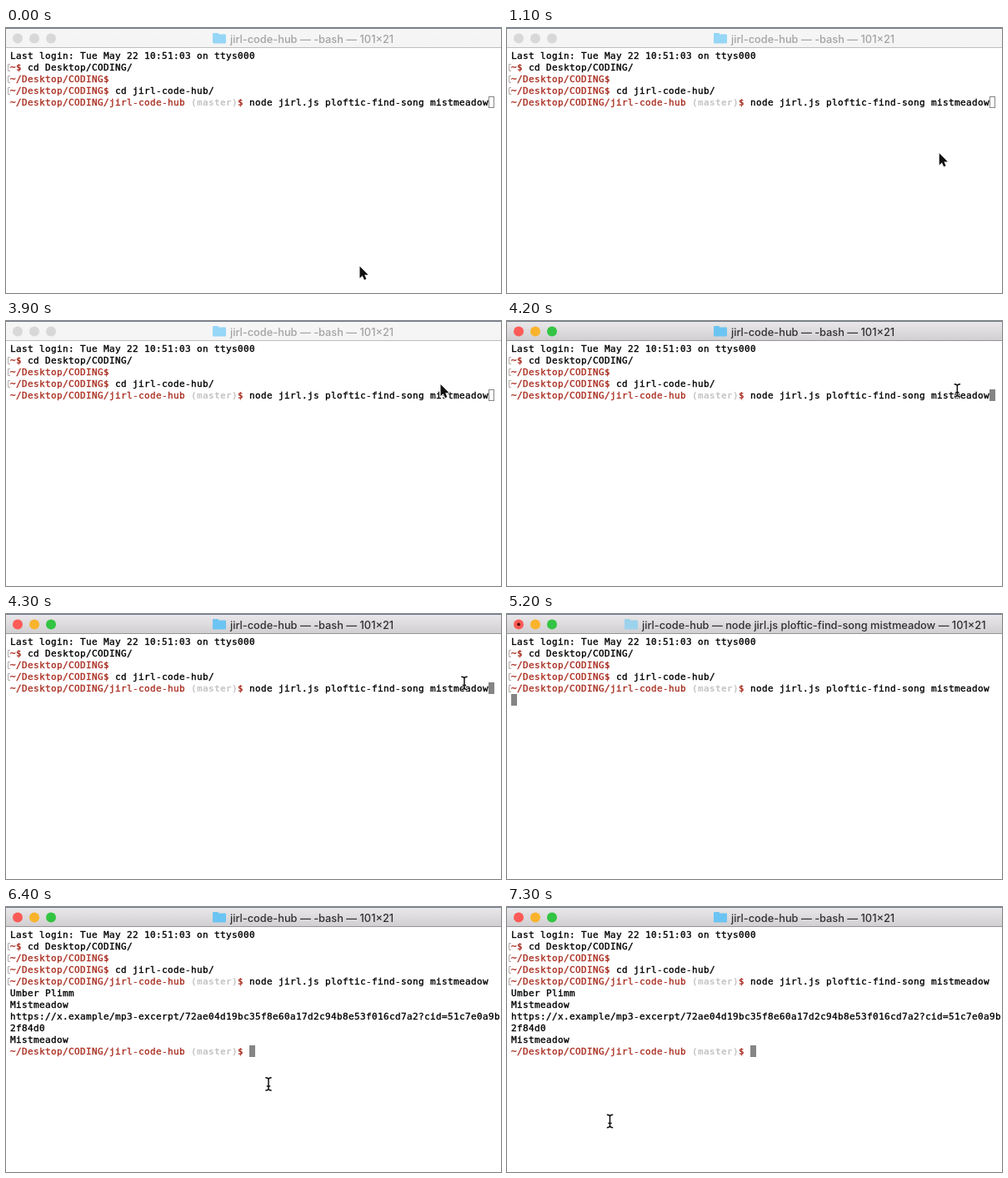
Animation of 594x318 px, one loop 7400 ms. Source, as an HTML page with a canvas:

```html
<!DOCTYPE html>
<html lang="en">
<head>
<meta charset="utf-8">
<title>Terminal session</title>
<style>
html, body { margin: 0; width: 100%; height: 100%; overflow: hidden; background: #fff; }
canvas { display: block; width: 594px; height: 318px; }
</style>
</head>
<body>
<canvas id="stage" width="594" height="318"></canvas>
<script>
const ctx = document.getElementById('stage').getContext('2d');
const W = 594, H = 318, LOOP = 7400, STEP = 100;
const CELL = 7, LINE = 14, LEFT = 5, TOP = 26;
const RED = '#aa2f22', BLACK = '#000', PALE = '#c4c4c4';
const MONO = '11px "DejaVu Sans Mono", monospace';
const SANS = '500 12.8px Inter, sans-serif';

const APP = 'jirl-code-hub';
const COMMAND = 'node jirl.js ploftic-find-song mistmeadow';
const HOME = '~/Desktop/CODING';
const OUTPUT = [
  'Umber Plimm',
  'Mistmeadow',
  'https://x.example/mp3-excerpt/72ae04d19bc35f8e60a17d2c94b8e53f016cd7a2?cid=51c7e0a9b',
  '2f84d0',
  'Mistmeadow'
];

// Moments when the window changes state
const ACTIVE = 4200, RUN = 5000, NEWLINE = 5200, WAKE = 6000, DONE = 6400;

// Pointer strokes; between them it rests
const ORIGIN = { x: 424, y: 286 };
const STROKES = [
  { from: 500, to: 800, x: 574, y: 5 },
  { from: 800, to: 1300, x: 481, y: 247 },
  { from: 1400, to: 1700, x: 521, y: 68 },
  { from: 3800, to: 4000, x: 521, y: 84 },
  { from: 4000, to: 4300, x: 550, y: 83 },
  { from: 5900, to: 6700, x: 174, y: 290 },
  { from: 6700, to: 7300, x: 123.5, y: 257 }
];

const ARROW = new Path2D('M.5 0v14.2l3.2-3 2.3 5 2.4-1.1-2.2-4.8h4.5z');
const BEAM = new Path2D(
  'M-3.7-7.7Q0-7.7 0-5Q0-7.7 3.7-7.7M-3.7 7.7Q0 7.7 0 5Q0 7.7 3.7 7.7M0-6V6M-2.2 2.5H2.2');

function pointerAt(t) {
  return STROKES.reduce((p, s) => {
    const k = Math.min(1, Math.max(0, (t - s.from) / (s.to - s.from)));
    return { x: p.x + (s.x - p.x) * k, y: p.y + (s.y - p.y) * k };
  }, ORIGIN);
}

function put(text, col, row, color = BLACK, bold = false) {
  const x = LEFT + col * CELL, y = TOP + row * LINE + 11;
  ctx.font = (bold ? 'bold ' : '') + MONO;
  ctx.letterSpacing = '0px';
  ctx.letterSpacing = CELL - ctx.measureText('0').width + 'px';
  ctx.fillStyle = ctx.strokeStyle = color;
  ctx.fillText(text, x, y);
  if (!bold) {
    // a hairline gives the regular face a medium weight
    ctx.lineWidth = 0.35;
    ctx.strokeText(text, x, y);
  }
  ctx.letterSpacing = '0px';
  return col + text.length;
}

function prompt(row, path, branch = '', command = '') {
  let col = put(path, 0, row, RED);
  if (branch) col = put(branch, col + 1, row, PALE, true);
  col = put('$', col, row, RED, true);
  return put(command, col + 1, row);
}

function bracket(row) {
  ctx.strokeStyle = '#b5aaaa';
  ctx.lineWidth = 1;
  ctx.stroke(new Path2D(`M5 ${TOP + row * LINE + 3.5}h-2.5v8h2.5`));
}

function caret(col, row, filled) {
  const x = LEFT + col * CELL, y = TOP + row * LINE;
  ctx.fillStyle = ctx.strokeStyle = '#858585';
  ctx.lineWidth = 1;
  if (filled) ctx.fillRect(x, y, CELL, LINE);
  else ctx.strokeRect(x + 0.5, y + 0.5, CELL - 1, LINE - 1);
}

function disc(x, r, fill) {
  ctx.beginPath();
  ctx.arc(x, 12.5, r, 0, Math.PI * 2);
  ctx.fillStyle = fill;
  ctx.fill();
}

function folder(x, color) {
  ctx.fillStyle = color;
  ctx.beginPath();
  ctx.roundRect(x, 6, 7, 5, 1);
  ctx.roundRect(x, 7.5, 16, 11, 1);
  ctx.fill();
}

function titleBar(active, running) {
  const fill = ctx.createLinearGradient(0, 1, 0, 23);
  fill.addColorStop(0, active ? '#e9e7e9' : '#f6f6f6');
  fill.addColorStop(1, active ? '#d1cfd1' : '#f4f4f4');
  ctx.fillStyle = fill;
  ctx.fillRect(0, 0, W, 23);
  ctx.fillStyle = '#6c7c90';
  ctx.fillRect(0, 0, W, 1);
  ctx.fillStyle = active ? '#969497' : '#bdbdbd';
  ctx.fillRect(0, 23, W, 1);

  ['#fc5b57', '#fab32c', '#33c443'].forEach((color, i) => {
    disc(14 + i * 20, 6, active ? color : '#d8d8d8');
  });
  if (running) disc(14, 1.9, '#5a0a08');

  const x = running ? 162 : 269;
  folder(x - 21, running ? '#9bd2ec' : active ? '#6cc4f2' : '#96d6f6');
  ctx.font = SANS;
  ctx.fillStyle = active ? '#303030' : '#a3a3a3';
  ctx.fillText(`${APP} — ${running ? COMMAND : '-bash'} — 101×21`, x, 17.5);
}

function pointer(t, active) {
  const { x, y } = pointerAt(t);
  ctx.save();
  ctx.translate(x, y);
  ctx.lineJoin = 'round';
  ctx.strokeStyle = '#fff';
  ctx.lineWidth = active ? 3 : 2;
  ctx.stroke(active ? BEAM : ARROW);
  ctx.fillStyle = ctx.strokeStyle = '#111';
  ctx.lineWidth = 1.5;
  if (active) ctx.stroke(BEAM);
  else ctx.fill(ARROW);
  ctx.restore();
}

function draw(t) {
  const active = t >= ACTIVE, running = t >= RUN && t < DONE;
  ctx.fillStyle = '#fff';
  ctx.fillRect(0, 0, W, H);
  titleBar(active, running);

  put('Last login: Tue May 22 10:51:03 on ttys000', 0, 0);
  prompt(1, '~', '', 'cd Desktop/CODING/');
  prompt(2, HOME);
  prompt(3, HOME, '', 'cd ' + APP + '/');
  const end = prompt(4, HOME + '/' + APP, '(master)', COMMAND);
  for (let row = 1; row < (t >= RUN ? 5 : 4); row++) bracket(row);

  if (t >= DONE) {
    OUTPUT.forEach((line, i) => put(line, 0, 5 + i));
    caret(prompt(10, HOME + '/' + APP, '(master)'), 10, true);
  } else if (t >= NEWLINE) {
    caret(0, 5, true);
  } else {
    caret(end, 4, active);
  }

  // Typing hides the pointer until it moves again
  if (t < RUN || t >= WAKE) pointer(t, active);
}

const start = performance.now();
function tick() {
  const t = (performance.now() - start) % LOOP;
  draw(Math.floor(t / STEP) * STEP);
  requestAnimationFrame(tick);
}
tick();
</script>
</body>
</html>
```
